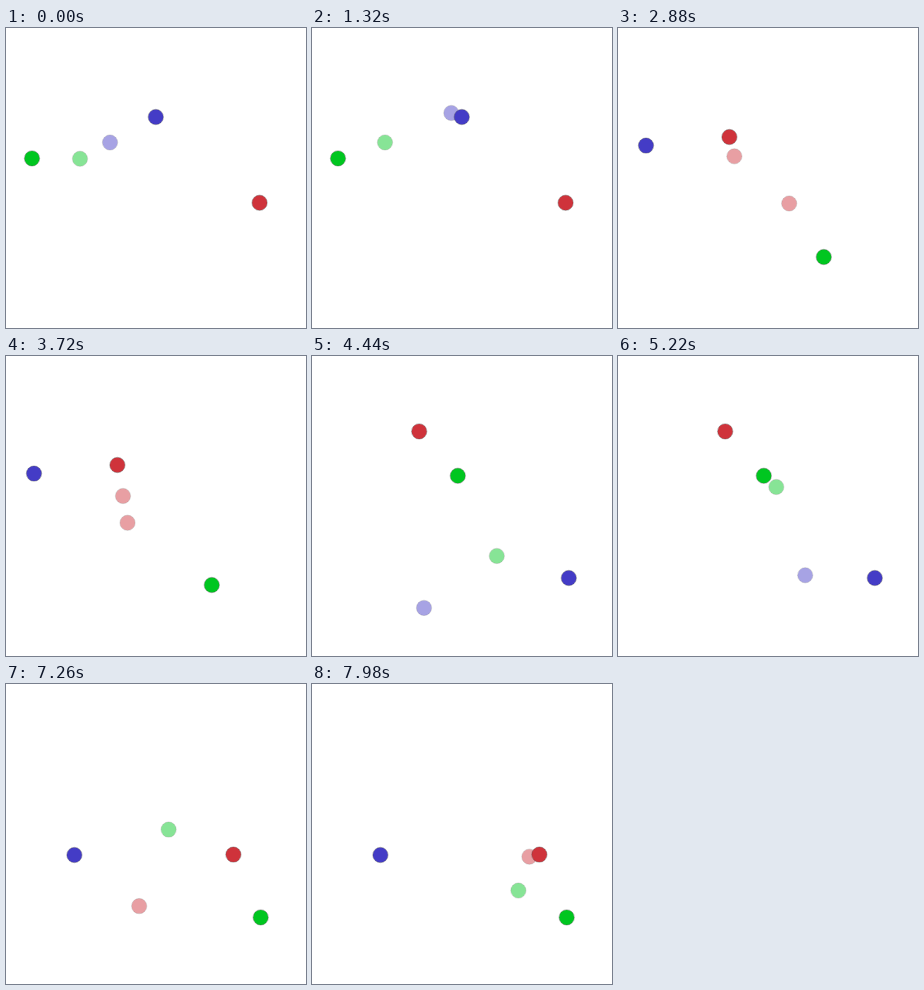
Animation, 300 px wide and 300 px high, one loop 8 s. Source, as an HTML page with a canvas:

```html
<!DOCTYPE html>
<html lang="en">
<head>
<meta charset="utf-8">
<title>Agents and landmarks</title>
<style>
html, body { margin: 0; width: 100%; height: 100%; overflow: hidden; background: #fff; }
canvas { display: block; width: 300px; height: 300px; }
</style>
</head>
<body>
<canvas id="stage" width="300" height="300"></canvas>
<script>
const ctx = document.getElementById('stage').getContext('2d');
const LOOP = 8000, TICK = 60;
const EPISODE = 2400, LEAD_IN = 870;   // the loop opens inside the first episode
const RETARGET = 1100;                 // when an agent turns to its second goal
const COLORS = { red: '#cf333b', green: '#00c620', blue: '#443cc6' };

const agent = (color, start, goal, nextGoal = goal) => ({ color, start, goal, nextGoal });

const episodes = [
  {
    landmarks: { red: [253.6, 174.8], green: [26, 130.4], blue: [149.8, 89] },
    agents: [
      agent('green', [75.4, 153.8], [73, 114.7]),
      agent('blue', [60, 185], [134.8, 65.2], [140.3, 93.4])
    ]
  },
  {
    landmarks: { red: [111.4, 109], green: [205.8, 229], blue: [28, 117.6] },
    agents: [
      agent('red', [68, 92], [201.5, 194.3], [90.7, 155.7]),
      agent('red', [228, 230], [93.2, 105.2], [127, 154])
    ]
  },
  {
    landmarks: { red: [107.2, 75.4], green: [145.8, 119.8], blue: [256.8, 222] },
    agents: [
      agent('green', [200, 240], [149.2, 106.2], [155, 136]),
      agent('blue', [69, 271], [212.7, 207.2], [200, 225])
    ]
  },
  {
    landmarks: { red: [227.4, 170.6], green: [254.7, 233.4], blue: [68.4, 171] },
    agents: [
      agent('red', [8, 248], [206.6, 206.9], [274, 97]),
      agent('green', [95.5, 24], [202, 216.9], [234, 220])
    ]
  }
];

// Share of the way covered by a damped spring released at rest.
function spring(ms) {
  if (ms <= 0) return 0;
  const decay = 0.0016, freq = 0.0012;
  const a = freq * ms;
  return 1 - Math.exp(-decay * ms) * (Math.cos(a) + decay / freq * Math.sin(a));
}

function place({ start, goal, nextGoal }, ms) {
  const first = spring(ms), second = spring(ms - RETARGET);
  return start.map((s, i) => s + (goal[i] - s) * first + (nextGoal[i] - goal[i]) * second);
}

function disc([x, y], color, alpha) {
  ctx.globalAlpha = alpha;
  ctx.fillStyle = COLORS[color];
  ctx.beginPath();
  ctx.arc(x, y, 7.5, 0, 2 * Math.PI);
  ctx.fill();
  ctx.globalAlpha = alpha * 0.25;
  ctx.beginPath();
  ctx.arc(x, y, 7.7, 0, 2 * Math.PI);
  ctx.stroke();
  ctx.globalAlpha = 1;
}

function draw(now) {
  const t = Math.floor((now % LOOP) / TICK) * TICK + LEAD_IN;
  const { landmarks, agents } = episodes[Math.floor(t / EPISODE)];
  ctx.clearRect(0, 0, 300, 300);
  for (const a of agents) disc(place(a, t % EPISODE), a.color, 0.47);
  for (const color in landmarks) disc(landmarks[color], color, 1);
}

const origin = performance.now();
function frame() {
  draw(performance.now() - origin);
  requestAnimationFrame(frame);
}
frame();
</script>
</body>
</html>
```
